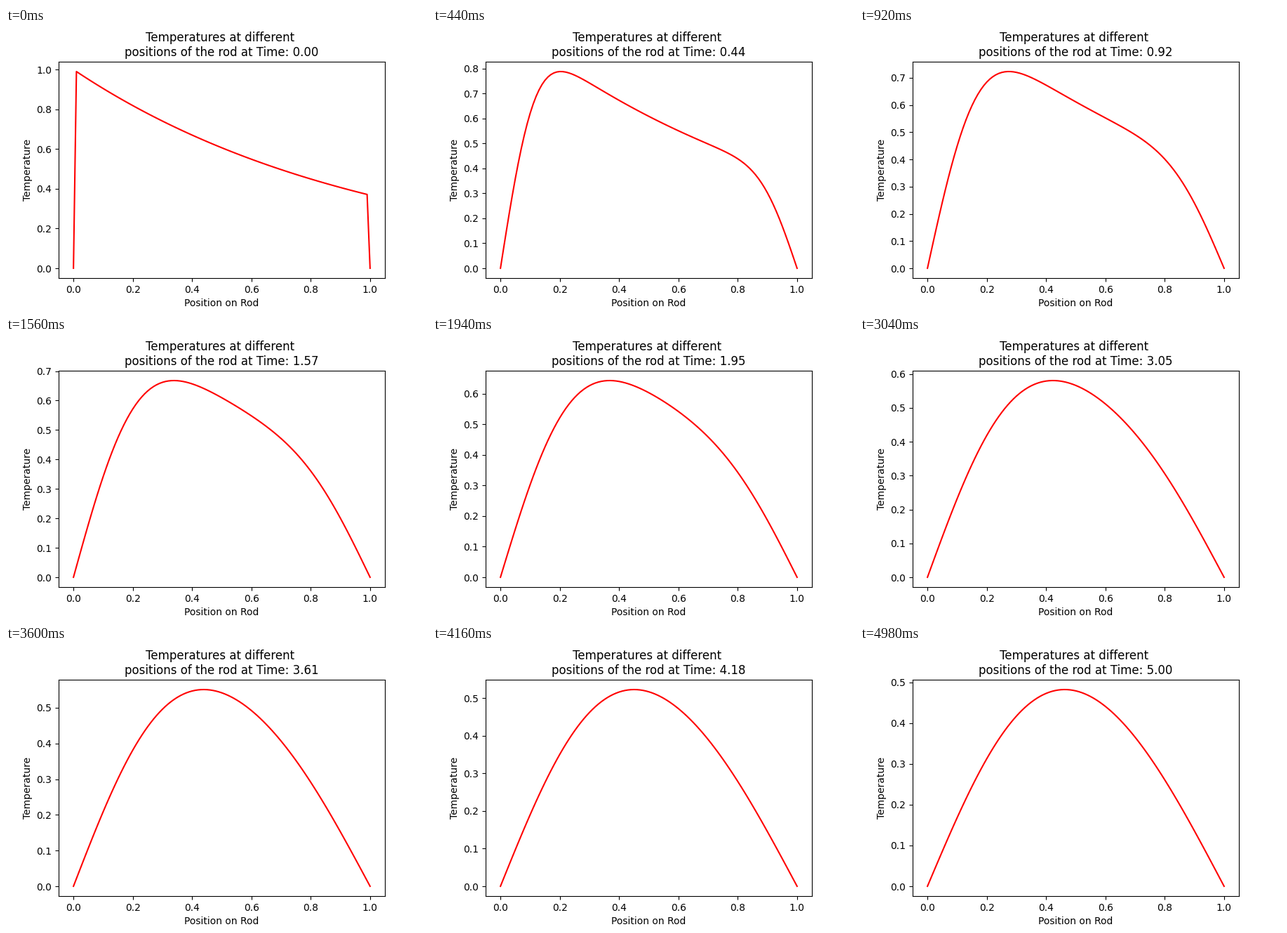
Write a matplotlib script that moves like this. It is 600 px wide and 400 px high and loops after 5000 ms.

```python
import numpy as np
import matplotlib.pyplot as plt
from matplotlib.animation import FuncAnimation

FRAMES = 250
DIFFUSIVITY = 0.01
CELLS = 100

x = np.linspace(0, 1, CELLS + 1)
times = np.linspace(0, 5, FRAMES)

# Sine modes of the discrete heat equation with both ends held at zero
k = np.arange(1, CELLS)
modes = np.sin(np.pi * np.outer(x, k))
start = np.exp(-x)
start[[0, -1]] = 0
weights = 2 / CELLS * modes.T @ start
rates = DIFFUSIVITY * (2 * CELLS * np.sin(np.pi * k / (2 * CELLS))) ** 2


def temperature(t):
    u = modes @ (weights * np.exp(-rates * t))
    u[[0, -1]] = 0
    return u


fig, ax = plt.subplots(figsize=(6, 4), dpi=100)
line, = ax.plot(x, start, color="red")
ax.set_xlabel("Position on Rod")
ax.set_ylabel("Temperature")


def update(i):
    t = times[i]
    line.set_data(x, temperature(t))
    ax.relim()
    ax.autoscale_view()
    ax.set_title(f"Temperatures at different \npositions of the rod at Time: {t:.2f}")
    return line,


anim = FuncAnimation(fig, update, frames=FRAMES, interval=20,
                     repeat=True, repeat_delay=0, blit=False)
plt.show()
```
